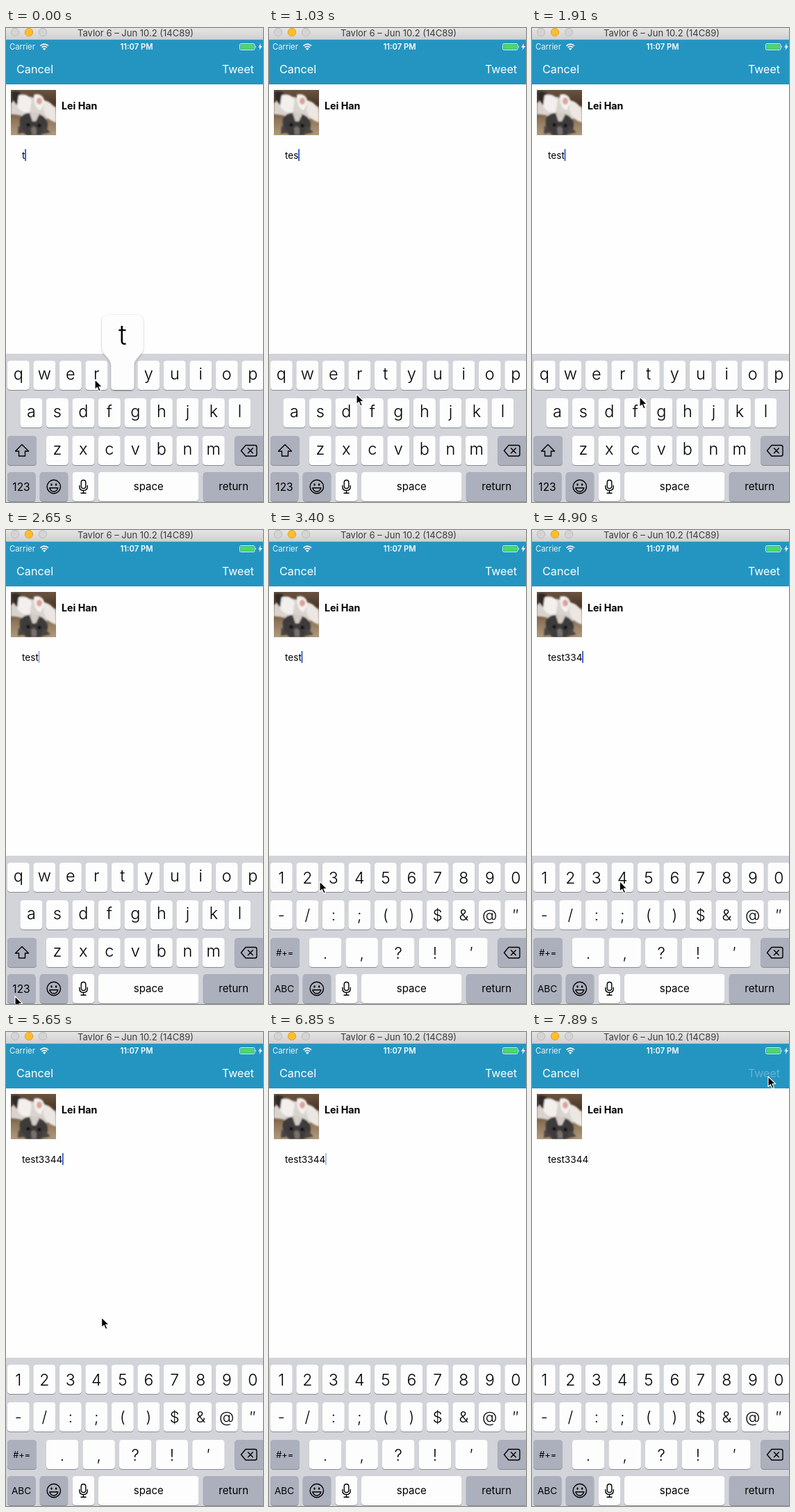
An HTML page that plays this animation: 370 by 681 pixels, repeating every 8000 ms.

```html
<!DOCTYPE html>
<html lang="en">
<head>
<meta charset="utf-8">
<title>Compose</title>
<style>
html, body { margin: 0; width: 100%; height: 100%; overflow: hidden; background: #fefefe; }
svg { display: block; width: 370px; height: 681px; font-family: Inter, Roboto, sans-serif; }
.line { fill: none; stroke: #000; stroke-width: 1.4; stroke-linecap: round; stroke-linejoin: round; }
</style>
</head>
<body>
<svg viewBox="0 0 370 681" xmlns="http://www.w3.org/2000/svg">
  <defs>
    <linearGradient id="bar" x2="0" y2="1"><stop stop-color="#e6e5e6"/><stop offset="1" stop-color="#d0cfd0"/></linearGradient>
    <linearGradient id="room" x2="0" y2="1"><stop stop-color="#6a5440"/><stop offset=".3" stop-color="#4c3829"/><stop offset=".65" stop-color="#8d7458"/><stop offset="1" stop-color="#b09a7c"/></linearGradient>
    <filter id="soft" x="-20%" y="-20%" width="140%" height="140%"><feGaussianBlur stdDeviation="1.3"/></filter>
    <filter id="lift" x="-30%" y="-20%" width="160%" height="140%"><feDropShadow dx="0" dy="1" stdDeviation="1.8" flood-color="#000" flood-opacity=".3"/></filter>
    <clipPath id="frame"><rect x="7" y="89" width="65" height="65"/></clipPath>
  </defs>

  <rect width="370" height="681" fill="#fefefe"/>
  <rect width="370" height="17" fill="url(#bar)"/>
  <rect y="16" width="370" height="1" fill="#b9b8b9"/>
  <g stroke-width="1">
    <circle cx="13" cy="6" r="5.7" fill="#d5d4d5" stroke="#bdbcbd"/>
    <circle cx="33" cy="6" r="5.7" fill="#fdbe2d" stroke="#e0a226"/>
    <circle cx="53" cy="6" r="5.7" fill="#d5d4d5" stroke="#bdbcbd"/>
  </g>
  <text x="186.5" y="11.5" font-size="13" text-anchor="middle" fill="#3b3b3b">Tavlor 6 – Jun 10.2 (14C89)</text>

  <rect y="17" width="370" height="64" fill="#2495c1"/>
  <g fill="#fff">
    <text x="5" y="31.3" font-size="11.3" fill-opacity=".9">Carrier</text>
    <text x="188" y="31.3" font-size="11.2" font-weight="600" text-anchor="middle">11:07 PM</text>
    <g fill="none" stroke="#fff" stroke-width="1.6">
      <path d="M49.5 25.6Q55.2 20.6 60.9 25.6M51.6 27.9Q55.2 24.8 58.8 27.9"/>
    </g>
    <path d="M53 29.6Q55.2 27.8 57.4 29.6L55.2 32Z"/>
    <rect x="336.5" y="22.5" width="21.5" height="9" rx="1.8" fill="none" stroke="#d9eef5" stroke-width="1"/>
    <rect x="337.6" y="23.6" width="19.3" height="6.8" rx=".8" fill="#4cd964"/>
    <path d="M359 25.3Q360.8 27 359 28.7ZM367 22L363.2 27.8H365.7L364.6 32L369 25.9H366.3Z"/>
    <text x="15" y="65" font-size="16.2">Cancel</text>
    <text id="send" x="357" y="65" font-size="16" text-anchor="end">Tweet</text>
  </g>

  <g clip-path="url(#frame)">
    <rect x="7" y="89" width="65" height="65" fill="url(#room)"/>
    <g filter="url(#soft)">
      <path d="M7 108Q22 94 40 100T72 114V128Q50 134 30 128Q16 124 7 124Z" fill="#d9d3ce"/>
      <path d="M8 92Q22 88 25 102L18 112Q8 106 8 92Z" fill="#2f2a2a"/>
      <path d="M18 97Q30 92 37 104L34 122Q20 122 16 112Z" fill="#f2efec"/>
      <path d="M40 96Q52 92 56 106L50 118Q40 116 40 96Z" fill="#f4f1ee"/>
      <path d="M55 104Q68 106 72 122V136Q58 132 54 118Z" fill="#ece7e2"/>
      <ellipse cx="48" cy="105" rx="4" ry="5" fill="#dba39b"/>
      <path d="M20 130Q26 120 40 122Q58 124 60 138Q60 152 48 154H30Q18 148 20 130Z" fill="#3c3a3b"/>
      <path d="M18 140L17 152L30 150ZM54 140L64 150L50 153Z" fill="#4c4542"/>
      <path d="M34 122Q42 119 48 124L43 134H38Z" fill="#d4cbc5"/>
      <circle cx="32" cy="139" r="2.6" fill="#111"/><circle cx="48" cy="140" r="2.6" fill="#111"/>
      <path d="M36 144Q40 138 44 145V153H37Z" fill="#77706c"/>
    </g>
  </g>
  <text x="80" y="116.7" font-size="14.2" font-weight="700">Lei Han</text>
  <text id="note" x="23" y="187.5" font-size="13.6"></text>
  <rect id="caret" y="174" width="2" height="17" fill="#3f66d6"/>

  <rect y="468" width="370" height="213" fill="#d2d4da"/>
  <g id="letters"></g>
  <g id="digits"></g>
  <g id="shared"></g>
  <g id="popup">
    <path filter="url(#lift)" fill="#fdfdfd" d="M-20 -66H20Q29.500 -66 29.500 -56V-19C29.500 -7 16.500 -5 16.500 8V37Q16.500 42 11.500 42H-11.500Q-16.500 42 -16.500 37V8C-16.500 -5 -29.500 -7 -29.500 -19V-56Q-29.500 -66 -20 -66Z"/>
    <text id="big" y="-23" font-size="39" font-weight="300" text-anchor="middle"></text>
  </g>
  <path id="mouse" d="M0 0V14.500L3.400 11.400L5.800 17L8.300 16L5.900 10.500H10.600Z" fill="#000" stroke="#fff" stroke-width="1.100" stroke-linejoin="round"/>
</svg>
<script>
const $ = id => document.getElementById(id);
const GRAY = '#acb0bc', WHITE = '#fdfdfd', PITCH = 37.5;
const ROWS = [478, 532, 586, 638];
const spots = {};

function box(x, y, w, fill = WHITE) {
  const rect = (dy, color) =>
    `<rect x="${x}" y="${y + dy}" width="${w}" height="42" rx="4.5" fill="${color}"/>`;
  return rect(1, '#898b91') + rect(0, fill);
}
function label(x, y, size, text, weight = 400) {
  return `<text x="${x}" y="${y}" font-size="${size}" font-weight="${weight}" text-anchor="middle">${text.replace('&', '&amp;')}</text>`;
}
function row(chars, x, top, drop, size, w = 32, pitch = PITCH) {
  return [...chars].map((ch, i) => {
    const left = x + i * pitch, mid = left + w / 2;
    spots[ch] = [mid, top];
    return box(left, top, w) + label(mid, top + drop, size, ch, 350);
  }).join('');
}

const [r1, r2, r3, r4] = ROWS;
$('letters').innerHTML =
  row('qwertyuiop', 1.8, r1, 27, 23.5) +
  row('asdfghjkl', 20.4, r2, 27, 23.5) +
  row('zxcvbnm', 57.8, r3, 27, 23.5) +
  box(2, r3, 42, GRAY) +
  '<path class="line" d="M23 598.500L32.500 608H27.500V615H18.500V608H13.500Z"/>' +
  box(2, r4, 40.500, GRAY) + label(22, 665, 15.5, '123');
$('digits').innerHTML =
  row('1234567890', 1.8, r1, 29.5, 23) +
  row('-/:;()$&@″', 1.8, r2, 29, 22) +
  row('.,?!′', 57.8, r3, 29.5, 22.5, 46.5, 52.6) +
  box(2, r3, 42, GRAY) + label(22.7, 612, 12.7, '#+=') +
  box(2, r4, 40.500, GRAY) + label(22, 663.5, 13.6, 'ABC');
$('shared').innerHTML =
  box(329.3, r3, 46, GRAY) +
  '<path class="line" d="M345 599.500H358.500Q361 599.500 361 602V612.500Q361 615 358.500 615H345L338.500 607.200ZM348.500 603.800L355.300 610.700M355.300 603.800L348.500 610.700"/>' +
  box(48.7, r4, 40.5, GRAY) +
  '<circle class="line" cx="68.800" cy="659" r="9.700"/>' +
  '<ellipse cx="65.500" cy="656" rx="1.200" ry="1.800"/><ellipse cx="72.100" cy="656" rx="1.200" ry="1.800"/>' +
  '<path class="line" d="M62.800 660.800H74.800Q73.300 666 68.800 666T62.800 660.800Z"/>' +
  box(95.6, r4, 31.6) +
  '<rect class="line" x="108.200" y="649.500" width="6.600" height="12" rx="3.300"/>' +
  '<path class="line" d="M105.800 657.500V659Q105.800 664.500 111.500 664.500T117.200 659V657.500M111.500 664.500V668M108 668.300H115"/>' +
  box(133, r4, 144.5) + label(205.3, 664, 15, 'space') +
  box(283.8, r4, 92, GRAY) + label(327.7, 664, 15.1, 'return');

// Start of every step: 150 ms each, with a few 140 ms ones.
const LOOP = 8000, SHORT = [0, 6, 13, 15, 17, 50];
const steps = [0];
for (let i = 0; i < 53; i++) steps.push(steps[i] + (SHORT.includes(i) ? 140 : 150));

const TYPED = [[0, 't'], [290, 'te'], [740, 'tes'], [1480, 'test'], [3700, 'test3'],
  [4150, 'test33'], [4750, 'test334'], [5200, 'test3344']];
const BLINKS = [0, 290, 740, 1710, 2950, 3700, 4150, 4750, 5280];
const PRESSES = [[0, 140, 't'], [290, 440, 'e'], [590, 890, 's'], [1330, 1600, 't'],
  [3700, 3850, '3'], [4000, 4150, '3'], [4600, 4900, '4'], [5050, 5350, '4']];
const PATH = [[0, 128, 505], [140, 105, 506], [290, 90, 508], [440, 88, 512], [740, 75, 554],
  [890, 84, 550], [1030, 126, 526], [1180, 158, 510], [1330, 163, 505], [1630, 163, 505],
  [1780, 155, 530], [2360, 21, 661], [2650, 13, 670], [2950, 13, 670], [3400, 73, 505],
  [3550, 86, 504], [4300, 86, 504], [4600, 126, 505], [5500, 127, 504], [5950, 159, 222],
  [6100, 159, 222], [6250, 212, 222], [6550, 210, 221]];
const RETURN = [[7150, 362, 130], [7300, 355, 95], [7590, 340, 64], [LOOP, 340, 64]];

const last = (list, test) => list.filter(test).pop();

function along(path, t) {
  const i = path.findIndex(p => p[0] > t);
  if (i < 1) return null;
  const [a, x0, y0] = path[i - 1], [b, x1, y1] = path[i], k = (t - a) / (b - a);
  return [x0 + (x1 - x0) * k, y0 + (y1 - y0) * k];
}
function blink(age) {
  const p = age % 1000;
  if (age < 500 || p < 505) return 1;
  if (p < 625) return (625 - p) / 120;
  return Math.max(0, (p - 880) / 120);
}
function show(el, on) { el.style.display = on ? '' : 'none'; }

function draw(time) {
  const t = last(steps, s => s <= time);
  const note = $('note'), caret = $('caret');
  note.textContent = last(TYPED, e => e[0] <= t)[1];
  caret.setAttribute('x', 22.6 + note.getComputedTextLength());
  caret.setAttribute('opacity', blink(t - last(BLINKS, b => b <= t)));

  show($('letters'), t < 2800);
  show($('digits'), t >= 2800);
  const press = PRESSES.find(p => p[0] <= t && t < p[1]);
  show($('popup'), press);
  if (press) {
    $('popup').setAttribute('transform', `translate(${spots[press[2]]})`);
    $('big').textContent = press[2];
  }

  const at = along(PATH, t) || along(RETURN, t);
  show($('mouse'), at);
  if (at) $('mouse').setAttribute('transform', `translate(${at})`);
  $('send').setAttribute('fill-opacity', t >= 7740 ? .28 : 1);
}

function tick(now) {
  draw(now % LOOP);
  requestAnimationFrame(tick);
}
draw(0);
requestAnimationFrame(tick);
</script>
</body>
</html>
```
